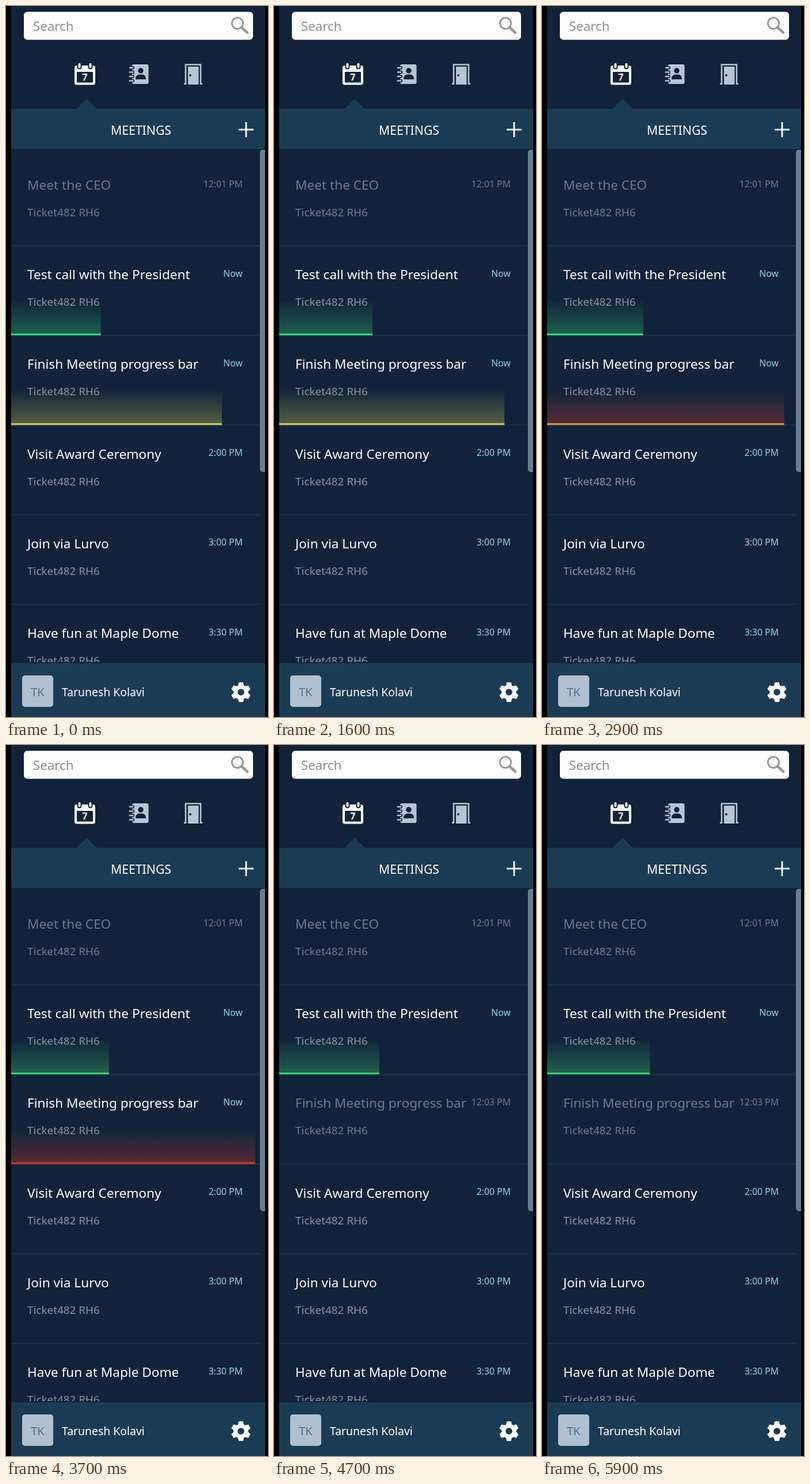
These frames come from a looping animation (455x1231 px, 6000 ms). An HTML page with a canvas:

```html
<!DOCTYPE html>
<html lang="en">
<head>
<meta charset="utf-8">
<title>Meetings</title>
<style>
html, body { margin: 0; width: 100%; height: 100%; overflow: hidden; background: #000; }
canvas { display: block; width: 455px; height: 1231px; }
</style>
</head>
<body>
<canvas id="stage" width="455" height="1231"></canvas>
<script>
const ctx = document.getElementById('stage').getContext('2d');
const LOOP = 6000, STEP = 100;
const LEFT = 9, RIGHT = 450, LIST_TOP = 248, FOOT_TOP = 1138, ROW = 155.2;
const BG = '#10233a', BAND = '#1b3b54', DIM = '#6b798a', SUB = '#8491a0';
const TIME = '#8fd3e3', ICON = '#b4c5d4', RULE = '#1c304a';
const GREEN = [54, 206, 108], YELLOW = [204, 196, 86], RED = [204, 56, 42];
const ACCOUNT = 'Ticket482 RH6';
const RED_AT = 2900, DONE_AT = 4200;

const rows = [
  ['Meet the CEO', '12:01 PM'],
  ['Test call with the President', 'Now'],
  ['Finish Meeting progress bar', 'Now'],
  ['Visit Award Ceremony', '2:00 PM'],
  ['Join via Lurvo', '3:00 PM'],
  ['Have fun at Maple Dome', '3:30 PM']
];

const rgba = (c, a) => `rgba(${c.join(',')},${a})`;
const mix = (a, b, k) => a.map((v, i) => Math.round(v + (b[i] - v) * k));

function text(str, x, y, size, color, align = 'left', weight = 400) {
  ctx.font = `${weight} ${size}px "Noto Sans", "Open Sans", sans-serif`;
  ctx.textAlign = align;
  ctx.fillStyle = color;
  ctx.fillText(str, x, y);
}

function rect(x, y, w, h, color, r = 0) {
  ctx.fillStyle = color;
  ctx.beginPath();
  ctx.roundRect(x, y, w, h, r);
  ctx.fill();
}

function disc(x, y, r, color) {
  ctx.fillStyle = color;
  ctx.beginPath();
  ctx.arc(x, y, r, 0, Math.PI * 2);
  ctx.fill();
}

function line(points, width, color, cap = 'butt') {
  ctx.strokeStyle = color;
  ctx.lineWidth = width;
  ctx.lineCap = cap;
  ctx.beginPath();
  points.forEach(([x, y]) => ctx.lineTo(x, y));
  ctx.stroke();
}

function searchBox() {
  rect(31, 10, 398, 48.5, '#fff', 6);
  text('Search', 47, 43, 22.3, '#8e8e8e');
  line([[409, 37], [419, 46]], 4.5, '#979797', 'round');
  ctx.lineWidth = 2.8;
  ctx.beginPath();
  ctx.arc(402, 30, 9.6, 0, Math.PI * 2);
  ctx.stroke();
}

function calendarIcon() {
  rect(119, 103, 36, 33.5, '#fff', 4);
  rect(123, 114, 28, 18.5, BG, 1);
  for (const x of [127.5, 146.5]) {
    rect(x - 4, 98, 8, 11.5, BG, 4);
    rect(x - 2, 99, 4, 8.5, '#fff', 2);
  }
  text('7', 137, 129, 16.5, '#fff', 'center', 700);
}

function contactsIcon() {
  rect(219, 101, 28.5, 34, ICON, 3);
  disc(234, 112, 4.7, BG);
  rect(225, 118.5, 18, 8.5, BG, [7, 7, 1, 1]);
  for (const y of [107, 114.5, 122, 129.5]) {
    rect(217.5, y - 2.8, 5.5, 5.6, BG, 2);
    rect(213.5, y - 1.3, 8, 2.6, ICON, 1.3);
  }
}

function doorIcon() {
  line([[309, 134.8], [312, 134.8], [312, 101.5], [338, 101.5], [338, 134.8], [341, 134.8]], 2.6, ICON);
  rect(316, 105, 18.5, 31, ICON);
  disc(320, 120, 1.9, BG);
}

function gear(cx, cy) {
  disc(cx, cy, 12.6, '#fff');
  for (let i = 0; i < 6; i++) {
    ctx.save();
    ctx.translate(cx, cy);
    ctx.rotate(i * Math.PI / 3);
    ctx.beginPath();
    ctx.moveTo(-5.4, -10);
    ctx.lineTo(-3.8, -17);
    ctx.lineTo(3.8, -17);
    ctx.lineTo(5.4, -10);
    ctx.fill();
    ctx.restore();
  }
  disc(cx, cy, 5.8, BAND);
}

function header() {
  searchBox();
  calendarIcon();
  contactsIcon();
  doorIcon();
  rect(LEFT, 178, RIGHT - LEFT, 69.5, BAND);
  ctx.beginPath();
  ctx.moveTo(122, 178.5);
  ctx.lineTo(140, 161);
  ctx.lineTo(158, 178.5);
  ctx.fill();
  text('MEETINGS', 234.5, 223, 21.2, '#fff', 'center');
  line([[404, 214], [430, 214]], 2.8, '#fff');
  line([[417, 201], [417, 227]], 2.8, '#fff');
}

function progress(row, end, glow, edge) {
  const bottom = LIST_TOP + 323 + (row - 1) * ROW;
  const fade = ctx.createLinearGradient(0, bottom - 62, 0, bottom);
  fade.addColorStop(0, rgba(glow, 0));
  fade.addColorStop(1, rgba(glow, 0.38));
  rect(LEFT, bottom - 62, end - LEFT, 61, fade);
  rect(LEFT, bottom - 4, end - LEFT, 3.2, rgba(edge, 1));
}

function list(ms) {
  const s = ms / 1000, done = ms >= DONE_AT, late = ms >= RED_AT;
  ctx.save();
  ctx.beginPath();
  ctx.rect(LEFT, LIST_TOP, RIGHT - LEFT, 1136 - LIST_TOP);
  ctx.clip();
  for (let i = 1; i < rows.length; i++) {
    rect(LEFT, 259 + i * ROW, 432, 2, RULE);
  }
  progress(1, 164.7 + 3.83 * s, GREEN, GREEN);
  if (!done) {
    const k = late ? Math.min(1, (ms - RED_AT + 100) / 300) : 0;
    progress(2, 375 + 15.7 * s, late ? RED : YELLOW, mix(YELLOW, RED, k));
  }
  rows.forEach(([title, when], i) => {
    const y = i * ROW, past = i === 0 || (i === 2 && done);
    text(title, 37, 318 + y, 22.6, past ? DIM : '#fff');
    text(ACCOUNT, 37, 364 + y, 18.9, past ? DIM : SUB);
    text(i === 2 && done ? '12:03 PM' : when, 411, 313.5 + y, 15.8, past ? DIM : TIME, 'right');
  });
  rect(441, 249, 9, 558, '#667d92', [5, 0, 0, 5]);
  ctx.restore();
}

function footer() {
  rect(LEFT, FOOT_TOP, RIGHT - LEFT, 1231 - FOOT_TOP, BAND);
  rect(28, 1159, 54, 54.5, '#afc1d0', 5);
  text('TK', 55, 1195, 20, '#587286', 'center');
  text('Tarunesh Kolavi', 97, 1195, 19.4, '#fff');
  gear(408, 1188);
}

function draw(ms) {
  rect(0, 0, 455, 1231, '#000');
  rect(LEFT, 0, RIGHT - LEFT, 1231, BG);
  header();
  list(ms);
  footer();
}

const start = performance.now();
function tick() {
  const ms = (performance.now() - start) % LOOP;
  draw(Math.floor(ms / STEP) * STEP);
  requestAnimationFrame(tick);
}
tick();
</script>
</body>
</html>
```
